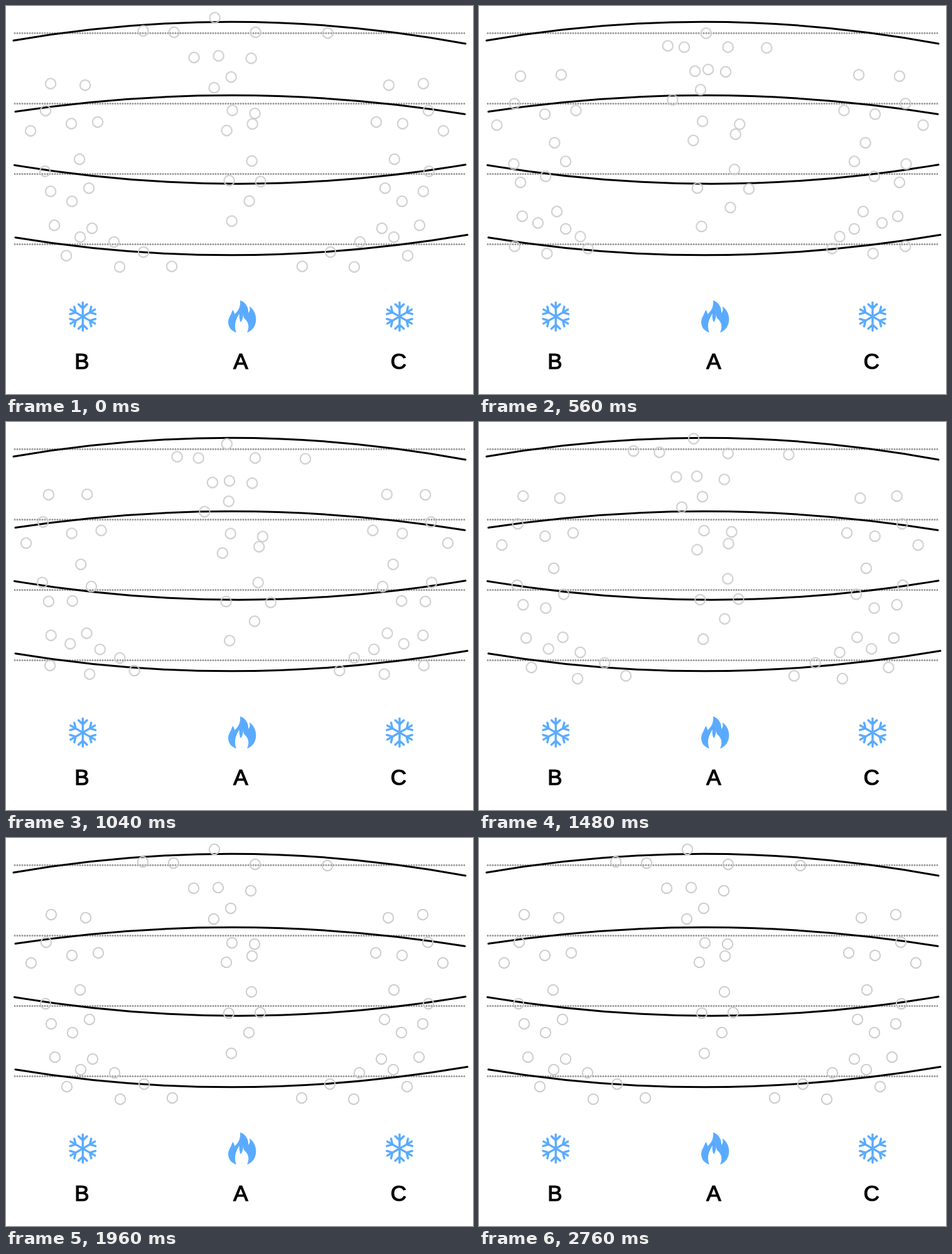
An HTML page that plays this animation: 744 px wide and 618 px high, repeating every 2.8 s.

```html
<!DOCTYPE html>
<html lang="en">
<head>
<meta charset="utf-8">
<title>Convection</title>
<style>
  html, body { margin: 0; width: 100%; height: 100%; overflow: hidden; background: #fff; }
  svg { display: block; width: 744px; height: 618px; }
  #rest { fill: none; stroke: #939393; stroke-width: 3; stroke-linecap: round; stroke-dasharray: 0 4; }
  .layers { fill: none; stroke: #000; stroke-width: 3; stroke-linecap: round; }
  #arm { fill: none; stroke: #5aabff; stroke-width: 3.4; stroke-linecap: round; }
  .flame { fill: #5aabff; }
  text {
    font: 35px "Liberation Sans", Arial, sans-serif; text-anchor: middle;
    stroke: #000; stroke-width: 1.2;
  }
  circle {
    fill: none; stroke: #ccc; stroke-width: 2;
    animation: drift 2800ms -1ms infinite, shake 80ms -1ms step-end infinite;
  }
  @keyframes drift {
    0% { translate: var(--dx) var(--dy); animation-timing-function: steps(49, end); }
    70%, 100% { translate: 0 0; }
  }
  @keyframes shake {
    0% { transform: translate(var(--jx), var(--jy)); }
    50%, 100% { transform: none; }
  }
</style>
</head>
<body>
<svg viewBox="0 0 744 618">
  <defs>
    <path id="rest" d="M14 0H731"/>
    <path id="arm" d="M0 0V-22.5M-6.8 -19.5L0 -13L6.8 -19.5"/>
    <g id="flake">
      <use href="#arm"/>
      <use href="#arm" transform="rotate(60)"/>
      <use href="#arm" transform="rotate(120)"/>
      <use href="#arm" transform="rotate(180)"/>
      <use href="#arm" transform="rotate(240)"/>
      <use href="#arm" transform="rotate(300)"/>
    </g>
  </defs>
  <use href="#rest" y="43.3"/>
  <use href="#rest" y="155.4"/>
  <use href="#rest" y="267.5"/>
  <use href="#rest" y="379.6"/>
  <path class="layers" d="M12 55Q370 -6.800 732 60M15 168.300Q371 114.500 731 172.300M13.500 253.500Q373 313.200 732 252.700M15 368.700Q367 427 735 364.600"/>
  <g id="warm"></g>
  <g id="left"></g>
  <g id="right" transform="translate(736 0) scale(-1 1)"></g>
  <use href="#flake" x="122.3" y="494.6"/>
  <use href="#flake" x="627" y="494.6"/>
  <path class="flame" d="M373 469C381 471 387 480 386 489C389 486 389 482 387.500 478.500C395 483 398.300 491 398.300 499C398.300 509 393 517 384 520C388 512 387 504 380 498C378 496 378 493 378 490C378 496 376 501 374 504C372 500 371 495 372 490C367 497 362 508 367 520C358 517 354 511 354 503C354 496 359 492 361 484C363 486 364 488 364 491C370 486 374 479 373 469Z"/>
  <text x="121" y="577.5">B</text>
  <text x="374" y="577.5">A</text>
  <text x="625.5" y="577.5">C</text>
</svg>
<script>
  // Where the particles come to rest
  const warm = [
    [332, 18], [218, 38], [512, 44], [267, 40], [338, 79], [397, 42], [299, 80],
    [390, 84], [358, 112], [331, 129], [360, 167], [396, 169], [392, 188], [351, 198],
    [391, 245], [355, 279], [405, 278], [387, 310], [359, 343]
  ];
  const cold = [
    [64, 166], [72, 122], [127, 127], [147, 183], [105, 187], [40, 199], [118, 242],
    [63, 264], [106, 310], [133, 289], [72, 296], [138, 352], [220, 392], [78, 349],
    [173, 374], [119, 369], [97, 396], [265, 414], [182, 416]
  ];

  // Warm air gathers and rises, then spreads below the top layer
  const rise = (x, y) => [
    y > 100 ? 0.9 * (367 - x) : 0.65 * (x - 395),
    0.07 * y - 36
  ];

  // Cold air sinks in a plume, then spreads along the bottom layer
  const sink = (x, y) => [
    y > 335 ? (y - 335) / 80 * (40 + x / 3) : (100 - x) / 4,
    8 + 0.12 * x + 45 * Math.exp(-(((x - 120) / 30) ** 2) - ((y - 300) / 55) ** 2)
  ];

  function fill(id, points, flow, lean) {
    const group = document.getElementById(id);
    points.forEach(([x, y], i) => {
      const [dx, dy] = flow(x, y);
      const shift = { dx: -dx, dy: -dy, jx: lean, jy: 0.6 + 1.5 * Math.sin(2.4 * i) };
      const c = document.createElementNS("http://www.w3.org/2000/svg", "circle");
      c.setAttribute("cx", x);
      c.setAttribute("cy", y);
      c.setAttribute("r", 8.2);
      for (const name in shift) c.style.setProperty("--" + name, shift[name] + "px");
      group.append(c);
    });
  }

  fill("warm", warm, rise, 0.6);
  fill("left", cold, sink, -0.9);
  fill("right", cold, sink, -0.9);
</script>
</body>
</html>
```
